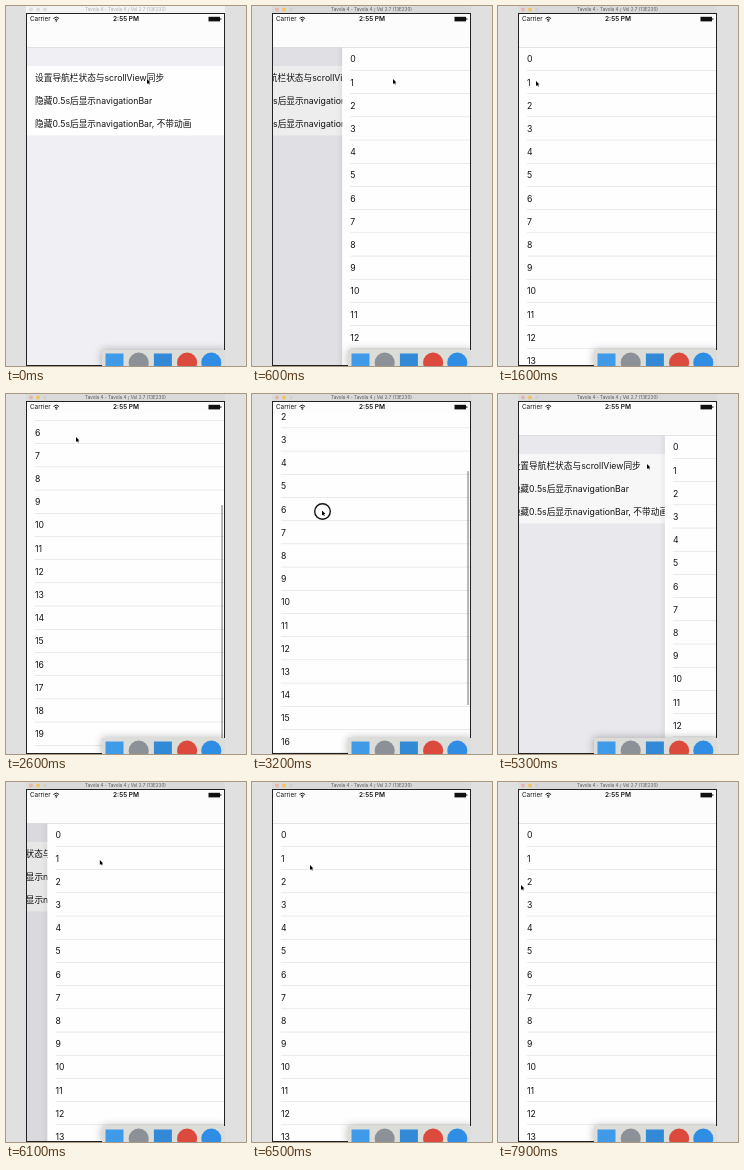
Recreate the animation shown at these times as an HTML page with a canvas. Size 240 px wide and 360 px high, loop 8 s.

```html
<!DOCTYPE html>
<html>
<head>
<meta charset="utf-8">
<style>
html, body { margin: 0; width: 100%; height: 100%; overflow: hidden; background: #e0e0e0; }
canvas { display: block; width: 240px; height: 360px; }
</style>
</head>
<body>
<canvas id="stage"></canvas>
<script>
const canvas = document.getElementById('stage');
const c = canvas.getContext('2d');
const dpr = window.devicePixelRatio || 1;
canvas.width = 240 * dpr;
canvas.height = 360 * dpr;

const LOOP = 8000, STEP = 100;
const LEFT = 21, WIDTH = 197, NAV = 41.5, STATUS = 18.5, ROW = 23.2, ROWS = 20, MAX_SCROLL = 154;
const FONT = 'Inter, "Noto Sans CJK SC", "Noto Sans CJK", sans-serif';
const MENU = [
  '设置导航栏状态与scrollView同步',
  '隐藏0.5s后显示navigationBar',
  '隐藏0.5s后显示navigationBar, 不带动画'
];
const ARROW = new Path2D('M0 0V5L1.2 3.9 2 5.6 2.8 5.2 2 3.6H3.5Z');
const DOCK = ['#3f9be8', '#8b9196', '#3289d6', '#dc4a3d', '#2f8de4'];

const mix = (a, b, k) => a + (b - a) * k;

// Everything that moves, as sums of eased ramps.
function pose(t) {
  const ramp = (from, to) => {
    const k = Math.min(1, Math.max(0, (t - from) / (to - from)));
    return k * k * (3 - 2 * k);
  };
  const during = (from, to) => t >= from && t < to;
  const scrolled = ramp(1900, 2500) - ramp(2900, 3500);
  const drag = ramp(4000, 5200);
  const toList = ramp(700, 1400), toEdge = ramp(3500, 3800);
  const away = ramp(5700, 6400), back = ramp(6800, 7700);
  return {
    scrolled,
    scroll: MAX_SCROLL * scrolled,
    slide: 1 - ramp(300, 800) + .65 * drag + .35 * ramp(5200, 5500) - ramp(5700, 6200),
    bar: ramp(1900, 2000) - ramp(3900, 4200),
    x: 141 - 103 * toList + 32 * ramp(1600, 2500) - 49.5 * toEdge + 128.5 * drag - 91 * away - 35 * back,
    y: 73 + 2 * toList + 115 * ramp(1600, 1900) - 147 * scrolled - 126 * toEdge + 6 * drag + 13 * away + 20 * back,
    active: t >= 200,
    pressed: during(200, 300) || during(1900, 2500) || during(2900, 3500) || during(3900, 5200) || during(5600, 5700)
  };
}

function rect(x, y, w, h, color) {
  c.fillStyle = color;
  c.fillRect(x, y, w, h);
}

function text(s, x, y, size, color = '#111', align = 'left', weight = 400) {
  c.font = `${weight} ${size}px ${FONT}`;
  c.textAlign = align;
  c.fillStyle = color;
  c.fillText(s, x, y);
}

function dot(x, y, r, color) {
  c.fillStyle = color;
  c.beginPath();
  c.arc(x, y, r, 0, 7);
  c.fill();
}

function clip(x, y, w, h, draw) {
  c.save();
  c.beginPath();
  c.rect(x, y, w, h);
  c.clip();
  draw();
  c.restore();
}

function drawMenu(x) {
  rect(x, 8, WIDTH, 352, '#efeff4');
  rect(x, 60, WIDTH, 69.5, '#fefefe');
  MENU.forEach((s, i) => text(s, x + 8, 74.5 + i * ROW, 8.7));
}

function drawList(x, scroll) {
  rect(x, 8, WIDTH, 352, '#fefefe');
  for (let i = 0; i < ROWS; i++) {
    const y = NAV + i * ROW - scroll;
    text(i, x + 8, y + 14.8, 8.7);
    rect(x + 8, y + ROW - .5, WIDTH - 8, .5, '#d4d4d7');
  }
}

function drawStatus() {
  text('Carrier', 24, 15.3, 6.3);
  text('2:55 PM', 120, 15.4, 6.5, '#111', 'center', 600);
  c.strokeStyle = '#111';
  c.lineWidth = 1;
  for (const r of [2, 4]) {
    c.beginPath();
    c.arc(50.3, 15.3, r, -2.35, -.79);
    c.stroke();
  }
  dot(50.3, 15, .8, '#111');
  rect(202.5, 10.8, 11.5, 4.6, '#111');
  rect(214.4, 12.2, .9, 1.8, '#111');
}

function drawWindow(active) {
  rect(20, 0, 199, 7.5, active ? '#dadada' : '#f3f3f3');
  const lights = active ? ['#e6b5b0', '#efc65c', '#d2d2d2'] : Array(3).fill('#dcdcdc');
  lights.forEach((color, i) => dot(25 + i * 7, 3.6, 2, color));
  text('Tavola 4 - Tavola 4 / Vel 2.7 (13E230)', 119.5, 5.4, 4.6, active ? '#555' : '#b0b0b0', 'center');
  c.strokeStyle = '#222';
  c.lineWidth = 1;
  c.strokeRect(20.5, 7.5, 198, 352);
}

function drawDock() {
  c.save();
  c.shadowColor = 'rgba(0,0,0,.3)';
  c.shadowBlur = 8 * dpr;
  rect(96, 344, 124, 17, '#dcddd9');
  c.restore();
  DOCK.forEach((color, i) => {
    const x = 108.5 + i * 24.2;
    if (i % 2 || i === 4) dot(x, 356.5, 10, color);
    else rect(x - 9, 347.5, 18, 13, color);
  });
}

function drawCursor({ x, y, pressed }) {
  c.save();
  c.translate(x, y);
  if (pressed) {
    c.strokeStyle = '#111';
    c.lineWidth = 1.4;
    c.beginPath();
    c.arc(.5, 1, 7.8, 0, 7);
    c.stroke();
  }
  c.strokeStyle = '#fff';
  c.lineWidth = .8;
  c.stroke(ARROW);
  c.fillStyle = '#000';
  c.fill(ARROW);
  c.restore();
}

function drawScreen({ slide, scroll, scrolled, bar }) {
  const x = LEFT + slide * WIDTH;
  if (slide > 0) drawMenu(LEFT - .3 * WIDTH * (1 - slide));
  if (slide > 0 && slide < 1) {
    rect(LEFT, 8, x - LEFT, 352, `rgba(0,0,0,${.1 * (1 - slide)})`);
    const shade = c.createLinearGradient(x - 6, 0, x, 0);
    shade.addColorStop(0, 'rgba(0,0,0,0)');
    shade.addColorStop(1, 'rgba(0,0,0,.05)');
    rect(x - 6, 8, 6, 352, shade);
  }
  if (slide < 1) drawList(x, scroll);

  const top = mix(43, 111, scrolled), end = mix(265, 357, scrolled);
  rect(x + 194.3, top, 1.5, end - top, `rgba(120,120,120,${.7 * bar})`);

  const bottom = Math.max(STATUS, NAV - scroll);
  rect(LEFT, 8, WIDTH, bottom - 8, '#fcfcfc');
  if (bottom > STATUS) rect(LEFT, bottom - .5, WIDTH, .5, '#cacacc');
  drawStatus();
}

function frame(now) {
  const p = pose(Math.floor(now % LOOP / STEP) * STEP);
  c.setTransform(dpr, 0, 0, dpr, 0, 0);
  rect(0, 0, 240, 360, '#e0e0e0');
  clip(20, 0, 199, 360, () => {
    clip(LEFT, 8, WIDTH, 352, () => drawScreen(p));
    drawWindow(p.active);
    drawDock();
    drawCursor(p);
  });
  requestAnimationFrame(frame);
}
requestAnimationFrame(frame);
</script>
</body>
</html>
```
